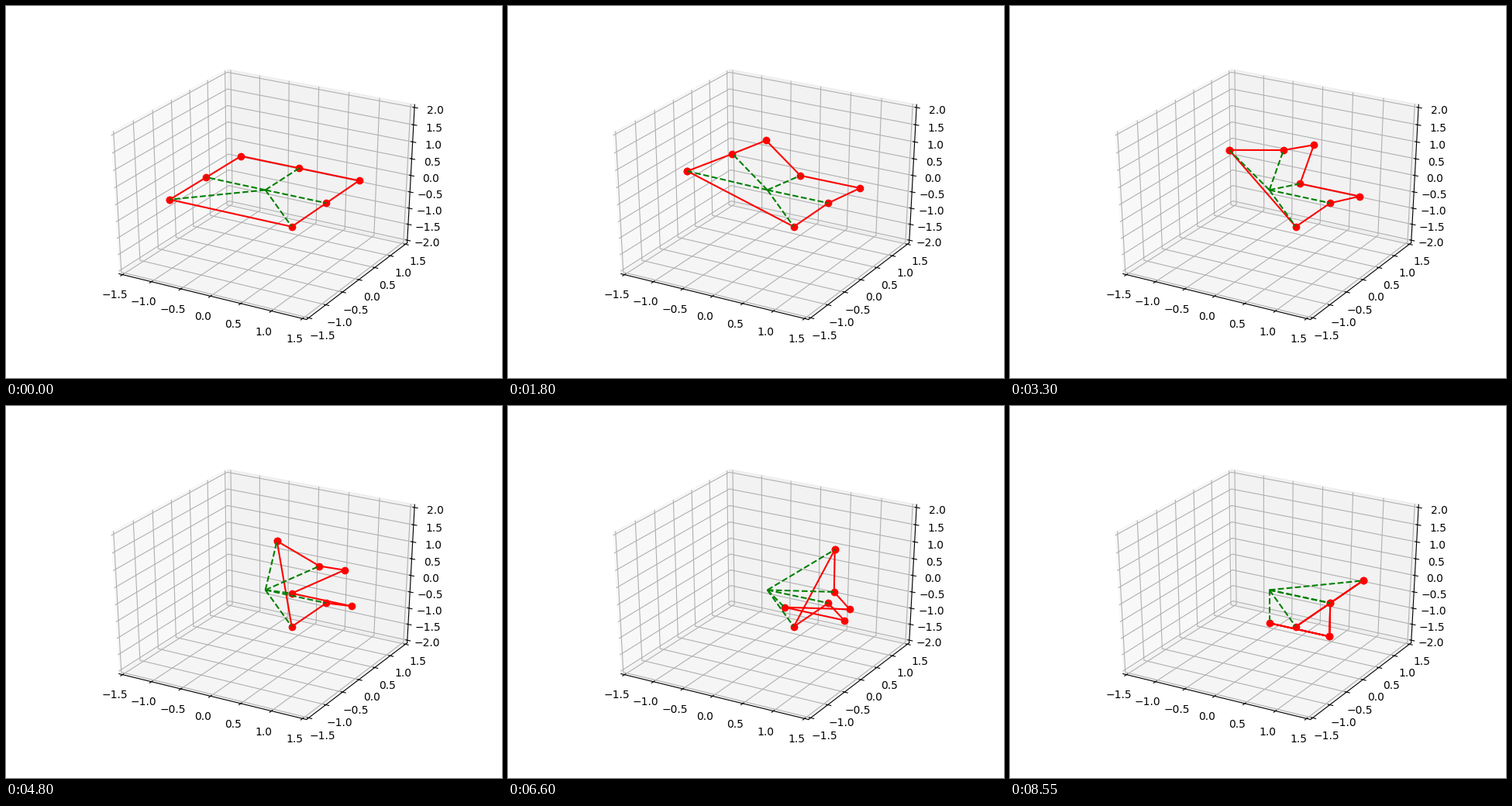
A matplotlib script for the animation above (8.85 s loop, 640x480 px).

```python
import numpy as np
import matplotlib.pyplot as plt
from matplotlib.animation import FuncAnimation
from mpl_toolkits.mplot3d import Axes3D

STEP_MS = 150
STEPS = 59
LAST = 57  # the folded state is held for one extra step

# main fold angle in degrees over the steps
KNOT_STEP = [0, 12, 22, 32, 39, 49, LAST]
KNOT_ANGLE = [0, 33.8, 65.4, 96.9, 118.0, 152.3, 180]


class WideAxes(Axes3D):
    """3D axes that fill their whole rectangle instead of a square."""

    def apply_aspect(self, position=None):
        pass


def fold(step):
    """Corners of the sheet, in order around the rim, at one step."""
    psi = np.radians(np.interp(step, KNOT_STEP, KNOT_ANGLE))
    half = psi / 2
    phi = np.arctan2(np.sin(half), np.sqrt(2) * np.cos(half))
    rho = 2 * np.arccos(np.cos(half) ** 2)

    near = np.array([-np.cos(psi), -np.cos(psi), np.sqrt(2) * np.sin(psi)])
    left = np.array([-np.cos(rho),
                     np.sin(rho) * np.sin(phi),
                     np.sin(rho) * np.cos(phi)])
    back = np.array([0, np.cos(phi), -np.sin(phi)])
    right = np.array([1, 0, 0])
    front = np.array([1, -1, 0])
    return np.array([near, left, left + back, back, right + back,
                     right, front, near])


CREASES = [5, 3, 1, 0, 6]  # rim points joined to the centre

fig = plt.figure(figsize=(6.4, 4.8), dpi=100)
ax = fig.add_axes([0.125, 0.11, 0.775, 0.77], axes_class=WideAxes)
ax.view_init(elev=30, azim=-60)
ax.set_box_aspect((1, 1, 1), zoom=np.sqrt(3) / 1.8294640721620434)

ax.set_xticks(np.arange(-1.5, 1.6, 0.5))
ax.set_yticks(np.arange(-1.5, 1.6, 0.5))
ax.set_zticks(np.arange(-2, 2.1, 0.5))
ax.set_xlim(-1.5, 1.5, view_margin=1 / 48)
ax.set_ylim(-1.5, 1.5, view_margin=1 / 48)
ax.set_zlim(-2, 2, view_margin=1 / 48)

rim, = ax.plot([], [], [], "ro-")
creases = [ax.plot([], [], [], "g--")[0] for _ in CREASES]


def update(i):
    pts = fold(min(i, LAST))
    rim.set_data_3d(*pts.T)
    for line, k in zip(creases, CREASES):
        line.set_data_3d(*np.array([np.zeros(3), pts[k]]).T)
    return [rim, *creases]


anim = FuncAnimation(fig, update, frames=STEPS, interval=STEP_MS,
                     init_func=lambda: update(0), repeat=True,
                     repeat_delay=0, blit=False)
plt.show()
```
